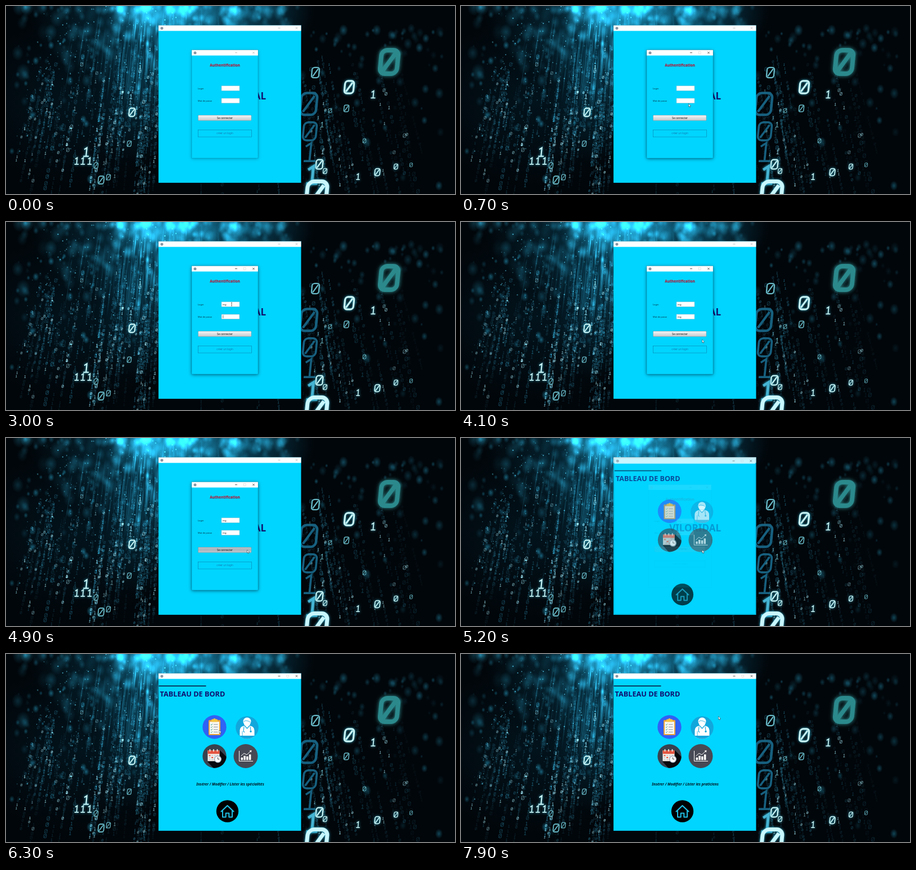
These frames come from a looping animation (798x336 px, 8000 ms). An HTML page with a canvas:

```html
<!DOCTYPE html>
<html lang="fr">
<head>
<meta charset="utf-8">
<title>Tableau de bord</title>
<style>
  html, body { margin: 0; width: 100%; height: 100%; overflow: hidden; background: #01060a; }
  canvas { display: block; }
</style>
</head>
<body>
<canvas id="stage" width="798" height="336"></canvas>
<script>
const W = 798, H = 336, LOOP = 8000, STEP = 100;
const SKY = '#00d5ff', NAVY = '#10106e', TAU = Math.PI * 2;
const SANS = '"Noto Sans", "Open Sans", sans-serif';
const stage = document.getElementById('stage').getContext('2d');
let g = stage;

let seed = 41;
function rnd() {
  seed = (seed * 16807) % 2147483647;
  return seed / 2147483647;
}

function rect(x, y, w, h, fill) {
  g.fillStyle = fill;
  g.fillRect(x, y, w, h);
}
function frame(x, y, w, h, color, width = 0.7) {
  g.strokeStyle = color;
  g.lineWidth = width;
  g.strokeRect(x, y, w, h);
}
function round(x, y, w, h, r, fill) {
  g.fillStyle = fill;
  g.beginPath();
  g.roundRect(x, y, w, h, r);
  g.fill();
}
function disc(x, y, r, fill) {
  g.fillStyle = fill;
  g.beginPath();
  g.arc(x, y, r, 0, TAU);
  g.fill();
}
function trace(points) {
  g.beginPath();
  points.forEach(([x, y], i) => i ? g.lineTo(x, y) : g.moveTo(x, y));
}
function poly(points, fill) {
  trace(points);
  g.closePath();
  g.fillStyle = fill;
  g.fill();
}
function line(points, color, width) {
  trace(points);
  g.strokeStyle = color;
  g.lineWidth = width;
  g.stroke();
}
function text(str, x, y, font, color, align = 'left') {
  g.font = font + ' ' + SANS;
  g.textAlign = align;
  g.textBaseline = 'alphabetic';
  g.fillStyle = color;
  g.fillText(str, x, y);
}

// ---------- backdrop ----------
function glow(x, y, rx, ry, rgb, a) {
  g.save();
  g.translate(x, y);
  g.scale(1, ry / rx);
  const grad = g.createRadialGradient(0, 0, 0, 0, 0, rx);
  grad.addColorStop(0, `rgba(${rgb},${a})`);
  grad.addColorStop(0.5, `rgba(${rgb},${a * 0.5})`);
  grad.addColorStop(1, `rgba(${rgb},0)`);
  rect(-rx, -rx, rx * 2, rx * 2, grad);
  g.restore();
}

// slanted, angular 0 or 1 centred on x, y
function digit(ch, x, y, size, color, weight = 0.09) {
  const h = size * 0.7, w = size * 0.5;
  g.save();
  g.transform(1, 0, -0.1, 1, x, y);
  g.beginPath();
  if (ch === '0') {
    g.roundRect(-w / 2, -h / 2, w, h, w * 0.32);
    g.moveTo(-w * 0.32, h * 0.36);
    g.lineTo(w * 0.32, -h * 0.36);
  } else {
    g.moveTo(-w * 0.4, -h * 0.3);
    g.lineTo(0, -h / 2);
    g.lineTo(0, h / 2);
    g.moveTo(-w * 0.45, h / 2);
    g.lineTo(w * 0.45, h / 2);
  }
  g.strokeStyle = color;
  g.lineWidth = Math.max(0.75, size * weight);
  g.stroke();
  g.restore();
}

// everything falls away from a point high above the centre
const lean = (x, y) => x + (x - 350) * 0.0007 * (y - 170);

function streaks(count, left, width, depth, alpha) {
  for (let i = 0; i < count; i++) {
    const x = left + width * (rnd() + rnd()) / 2;
    const y = rnd() * depth * 0.6, end = y + 15 + rnd() * depth * 0.5;
    const grad = g.createLinearGradient(0, y, 0, end);
    const a = alpha * (0.3 + rnd());
    grad.addColorStop(0, 'rgba(40,150,190,0)');
    grad.addColorStop(0.5, `rgba(50,165,200,${a})`);
    grad.addColorStop(1, 'rgba(40,150,180,0)');
    line([[lean(x, y), y], [lean(x, end), end]], grad, 0.8 + rnd() * 2);
  }
}

function bokeh(count, left, width, top, depth, size, alpha) {
  for (let i = 0; i < count; i++) {
    const r = size * (0.4 + rnd());
    glow(left + width * rnd(), top + depth * rnd() * rnd(), r, r * 1.3, '35,135,165', alpha * (0.2 + rnd()));
  }
}

function rain(count, left, width, top, bright) {
  for (let i = 0; i < count; i++) {
    const x = left + width * rnd(), size = 5 + rnd() * rnd() * 7;
    const lit = bright * (0.25 + rnd());
    let y = top + rnd() * 150;
    const end = y + 40 + rnd() * 170;
    for (; y < end; y += size * (0.85 + rnd() * 0.5)) {
      if (rnd() < 0.25) continue;
      const flash = rnd() < 0.1;
      const a = Math.min(1, lit * (0.3 + rnd() * 0.8) + (flash ? 0.4 : 0));
      digit(rnd() < 0.5 ? '0' : '1', lean(x, y), y, size,
        flash ? `rgba(170,235,245,${a})` : `rgba(45,150,185,${a})`);
    }
  }
}

// character, x, y, size
const BRIGHT = [
  ['0', 610, 145, 32], ['0', 224, 190, 21], ['0', 557, 283, 24], ['0', 660, 297, 18],
  ['1', 143, 261, 22], ['1', 126, 277, 17], ['1', 137, 277, 17], ['1', 149, 277, 17],
  ['1', 653, 158, 18], ['0', 567, 295, 13], ['0', 693, 287, 13], ['1', 626, 305, 15]
];
const SOFT = [
  ['0', 169, 311, 20], ['0', 182, 306, 14], ['0', 160, 285, 14], ['0', 219, 246, 14],
  ['0', 605, 183, 17], ['0', 576, 187, 11], ['0', 637, 241, 11], ['1', 562, 212, 12],
  ['0', 720, 284, 10], ['0', 550, 119, 26]
];
const DEEP = [['0', 538, 175, 56], ['0', 540, 224, 46], ['1', 541, 261, 46]];

function paintBackdrop() {
  const sheet = document.createElement('canvas');
  sheet.width = W;
  sheet.height = H;
  g = sheet.getContext('2d');
  rect(0, 0, W, H, '#01060a');
  g.globalCompositeOperation = 'lighter';
  glow(290, 10, 250, 150, '10,72,95', 0.75);
  glow(285, 5, 110, 70, '25,120,150', 0.7);
  glow(430, 10, 120, 80, '10,70,92', 0.5);
  glow(130, 170, 200, 150, '3,26,36', 0.5);
  glow(235, 150, 80, 130, '6,50,66', 0.5);
  bokeh(260, 20, 500, 0, 150, 9, 0.3);
  bokeh(90, 180, 240, 0, 70, 10, 0.45);
  bokeh(70, 10, 260, 60, 270, 5, 0.5);
  bokeh(70, 525, 250, 40, 290, 6, 0.4);
  streaks(130, 60, 420, 180, 0.16);
  streaks(70, 170, 130, 190, 0.28);
  for (let i = 0; i < 420; i++) {
    const y = rnd() * 260;
    disc(lean(30 + rnd() * 270, y), y, 0.4 + rnd() * 0.9, `rgba(90,200,225,${0.15 + rnd() * 0.5})`);
  }
  rain(65, 40, 235, 80, 0.42);
  rain(34, 165, 106, 70, 0.55);
  rain(16, 275, 245, 250, 0.45);
  rain(22, 527, 75, 90, 0.4);
  rain(15, 590, 150, 100, 0.28);
  g.globalCompositeOperation = 'source-over';
  DEEP.forEach(d => digit(...d, '#17607f', 0.08));
  SOFT.forEach(d => digit(...d, '#68b9c6'));
  g.shadowColor = '#2aa6c4';
  g.shadowBlur = 4;
  BRIGHT.forEach(d => digit(...d, '#c9f5f6', 0.1));
  digit('1', 545, 302, 44, '#45b3d2', 0.11);
  digit('0', 552, 338, 70, '#c8f7ff', 0.1);
  g.shadowColor = '#2d8f92';
  g.shadowBlur = 7;
  digit('0', 681, 100, 60, '#2b898c', 0.13);
  g.shadowBlur = 0;
  g = stage;
  return sheet;
}

// ---------- windows ----------
function buttons(right, y, active) {
  const color = active ? '#222' : '#aaa';
  line([[right - 41, y], [right - 37, y]], color, 0.7);
  if (active) frame(right - 25.5, y - 1.8, 3.6, 3.6, '#ccc', 0.5);
  line([[right - 9.8, y - 1.8], [right - 6.2, y + 1.8]], color, 0.7);
  line([[right - 6.2, y - 1.8], [right - 9.8, y + 1.8]], color, 0.7);
}

function win(x, y, w, h, active, shadow = 0) {
  g.save();
  g.shadowColor = `rgba(0,20,40,${shadow})`;
  g.shadowBlur = 6;
  g.shadowOffsetY = 1;
  rect(x, y, w, h, SKY);
  g.restore();
  rect(x, y, w, 10, '#fff');
  disc(x + 6, y + 5.3, 2.5, '#8795a3');
  buttons(x + w, y + 5, active);
  frame(x, y, w, h, 'rgba(0,70,95,0.4)', 0.6);
}

function home() {
  win(271, 34.5, 253.5, 281.5, false);
  text('VILORIDAL', 462, 167, 'bold 17px', NAVY, 'right');
}

function field(y, value, focused) {
  rect(383, y, 32, 8.5, '#fff');
  frame(383, y, 32, 8.5, focused ? '#6f9cb3' : '#9fb9c4', 0.5);
  text(value, 385, y + 5.7, '4.2px', '#111');
  if (focused) rect(385.6 + value.length * 3, y + 1.5, 0.6, 5.5, '#222');
}

function dialog(t, shadow) {
  win(330, 78.5, 118, 193.5, t >= 300, shadow);
  text('Authentification', 389.4, 108.8, 'bold 6.5px', 'rgba(20,20,70,0.3)', 'center');
  text('Authentification', 389, 108.4, 'bold 6.5px', '#c81a35', 'center');
  text('Login', 341, 148.5, '4px', '#062c3c');
  text('Mot de passe', 341, 170.7, '4px', '#062c3c');
  const typed = (a, b) => 'mg'.slice(0, (t >= a) + (t >= b));
  field(142.8, typed(2000, 2200), t >= 1700 && t < 2500);
  field(165, typed(3100, 3200), t >= 2500 && t < 3400);

  const pressed = t >= 4900;
  const face = g.createLinearGradient(0, 195, 0, 205);
  face.addColorStop(0, pressed ? '#b9c2c8' : '#f8f8f8');
  face.addColorStop(0.5, pressed ? '#a8b4bc' : '#dcdfe1');
  face.addColorStop(1, pressed ? '#c3ccd1' : '#c4c9cd');
  round(341.5, 195, 94.5, 10, 1.5, face);
  frame(341.5, 195.2, 94.5, 9.4, '#7c929c', 0.5);
  text('Se connecter', 389, 201.7, '4.6px', '#151515', 'center');
  frame(341.5, 221.5, 95, 12.5, '#0a80ab', 0.6);
  text('créer un login', 389, 229, '4.5px', '#1479ad', 'center');
}

// ---------- dashboard icons ----------
function clipboard() {
  disc(370.5, 130.5, 21.2, '#2f62f5');
  round(360, 118, 21, 27, 1.5, '#e9a23b');
  rect(362, 121, 17, 22, '#f7f7f2');
  round(365, 116.5, 11, 5, 1.5, '#f4c542');
  disc(370.5, 117, 2, '#f4c542');
  for (let i = 0; i < 4; i++) {
    const y = 126 + i * 4.5;
    line([[363.8, y], [365, y + 1.2], [367, y - 1.3]], '#2fa58c', 0.9);
    line([[369, y], [376.5, y]], '#7c8798', 0.9);
  }
}

function doctor() {
  disc(428.5, 131.5, 20.3, '#12a7dc');
  g.save();
  g.beginPath();
  g.arc(428.5, 131.5, 20.3, 0, TAU);
  g.clip();
  round(415.5, 128.5, 26, 30, 8, '#fff');
  rect(415, 146, 27, 9, '#12a7dc');
  g.restore();
  disc(428.5, 120.5, 7, '#fff');
  poly([[422, 121], [435, 121], [433, 128], [428.5, 131], [424, 128]], '#fff');
  line([[422.5, 121], [426, 119], [431, 120], [434.5, 122]], '#12a7dc', 0.8);
  line([[424, 128], [428.5, 133], [433, 128]], '#12a7dc', 1.2);
  line([[423, 130], [422, 138], [424, 140]], '#12a7dc', 1.1);
  line([[434, 130], [435, 137]], '#12a7dc', 1.1);
  disc(435, 138.5, 1.7, '#12a7dc');
  line([[420, 138], [420, 146]], '#12a7dc', 0.8);
}

function calendar() {
  disc(370.5, 182.5, 21.2, '#38424f');
  g.save();
  g.beginPath();
  g.arc(370.5, 182.5, 21.2, 0, TAU);
  g.clip();
  poly([[380, 172], [400, 192], [400, 210], [374, 210], [358, 192]], '#07090d');
  g.restore();
  rect(358.5, 172.5, 21, 19, '#f5f2ec');
  rect(358.5, 172.5, 21, 6, '#e4533f');
  for (const x of [362.5, 369, 375.5]) round(x - 0.9, 170, 1.8, 4.5, 0.8, '#f5f2ec');
  for (let i = 0; i < 12; i++) {
    rect(360.5 + (i % 4) * 4.6, 180.5 + Math.floor(i / 4) * 3.5, 3, 2.1, i % 5 ? '#c9ced3' : '#e4533f');
  }
  disc(376.5, 188, 6.5, '#9fb4c5');
  disc(376.5, 188, 5.2, '#fff');
  line([[376.5, 184.5], [376.5, 188], [379.3, 188]], '#333', 0.9);
}

function chart() {
  disc(426, 182.5, 21.5, '#474a55');
  line([[414.5, 173], [414.5, 191.5], [439, 191.5]], '#fff', 1);
  [4.5, 7.5, 6.5, 10].forEach((h, i) => rect(417.5 + i * 4.8, 189.5 - h, 3.5, h, '#fff'));
  line([[417.5, 182.5], [423, 177.5], [428, 180], [435, 173.5]], '#fff', 1);
  poly([[436.5, 172], [435.8, 176], [432.6, 172.7]], '#fff');
}

function house() {
  disc(393.5, 281, 19.7, '#000');
  g.lineJoin = g.lineCap = 'round';
  line([[382.5, 281.5], [393.5, 271], [404.5, 281.5]], '#20bfe6', 2.2);
  line([[385, 280.5], [385, 291.5], [390.7, 291.5], [390.7, 284.5], [396.3, 284.5],
    [396.3, 291.5], [402, 291.5], [402, 280.5]], '#20bfe6', 2);
  g.lineJoin = 'miter';
  g.lineCap = 'butt';
}

function dashboard(t) {
  win(271, 34.5, 253.5, 281.5, true);
  rect(271.5, 56.4, 84, 1.6, '#08183c');
  text('TABLEAU DE BORD', 273.5, 75.6, 'bold 12.7px', NAVY);
  clipboard();
  doctor();
  calendar();
  chart();
  house();
  if (t >= 6000) {
    const topic = t < 7300 ? 'spécialités' : 'praticiens';
    text('Insérer / Modifier / Lister les ' + topic, 398.5, 234.6, 'italic bold 6.4px', '#031018', 'center');
  }
}

// ---------- motion ----------
const PATH = [
  [200, 412, 234], [1000, 401, 147], [3400, 401, 147], [4000, 428.5, 210], [4300, 428.5, 210],
  [4700, 428.5, 200], [5400, 428.5, 200], [6000, 379, 136], [6900, 379, 136],
  [7400, 425, 132], [7700, 443, 117], [7900, 457.5, 111.5]
];

function pointer(t) {
  if (t < PATH[0][0]) return;
  const n = PATH.findIndex(p => p[0] > t);
  let [, x, y] = PATH[PATH.length - 1];
  if (n > 0) {
    const [t0, x0, y0] = PATH[n - 1], [t1, x1, y1] = PATH[n];
    const u = (t - t0) / (t1 - t0), e = u * u * (3 - 2 * u);
    x = x0 + (x1 - x0) * e;
    y = y0 + (y1 - y0) * e;
  }
  const overField = t < 5000 && x > 383 && x < 415 && (Math.abs(y - 147) < 4.5 || Math.abs(y - 169) < 4.5);
  if (overField) {
    line([[x, y - 3], [x, y + 3]], '#333', 0.7);
    line([[x - 1, y - 3], [x + 1, y - 3]], '#333', 0.5);
    line([[x - 1, y + 3], [x + 1, y + 3]], '#333', 0.5);
    return;
  }
  const tip = [[0, 0], [0, 5.6], [1.3, 4.5], [2.2, 6.5], [3.1, 6.1], [2.3, 4.2], [4, 4.1]];
  poly(tip.map(([a, b]) => [x + a, y + b]), '#fff');
  g.strokeStyle = '#25485a';
  g.lineWidth = 0.6;
  g.stroke();
}

function pose(cx, cy, scale, alpha, draw) {
  g.save();
  g.globalAlpha = alpha;
  g.translate(cx, cy);
  g.scale(scale, scale);
  g.translate(-cx, -cy);
  draw();
  g.restore();
}

const backdrop = paintBackdrop();

function render(t) {
  g.drawImage(backdrop, 0, 0);
  if (t < 5400) home();
  if (t < 5100) {
    dialog(t, t < 300 ? 0.3 : 0.6);
  } else {
    const k = Math.min(1, (t - 5000) / 300);
    const shown = 1 - (1 - k) ** 1.1;
    pose(398, 176, 0.96 + 0.04 * k ** 0.8, shown, () => dashboard(t));
    if (t < 5300) pose(389, 175, 0.98 - 0.03 * (t - 5100) / 100, t < 5200 ? 0.5 : 0.1, () => dialog(t, 0));
  }
  pointer(t);
}

const start = performance.now();
function tick() {
  const t = (performance.now() - start) % LOOP;
  render(Math.floor(t / STEP) * STEP);
  requestAnimationFrame(tick);
}
tick();
</script>
</body>
</html>
```
